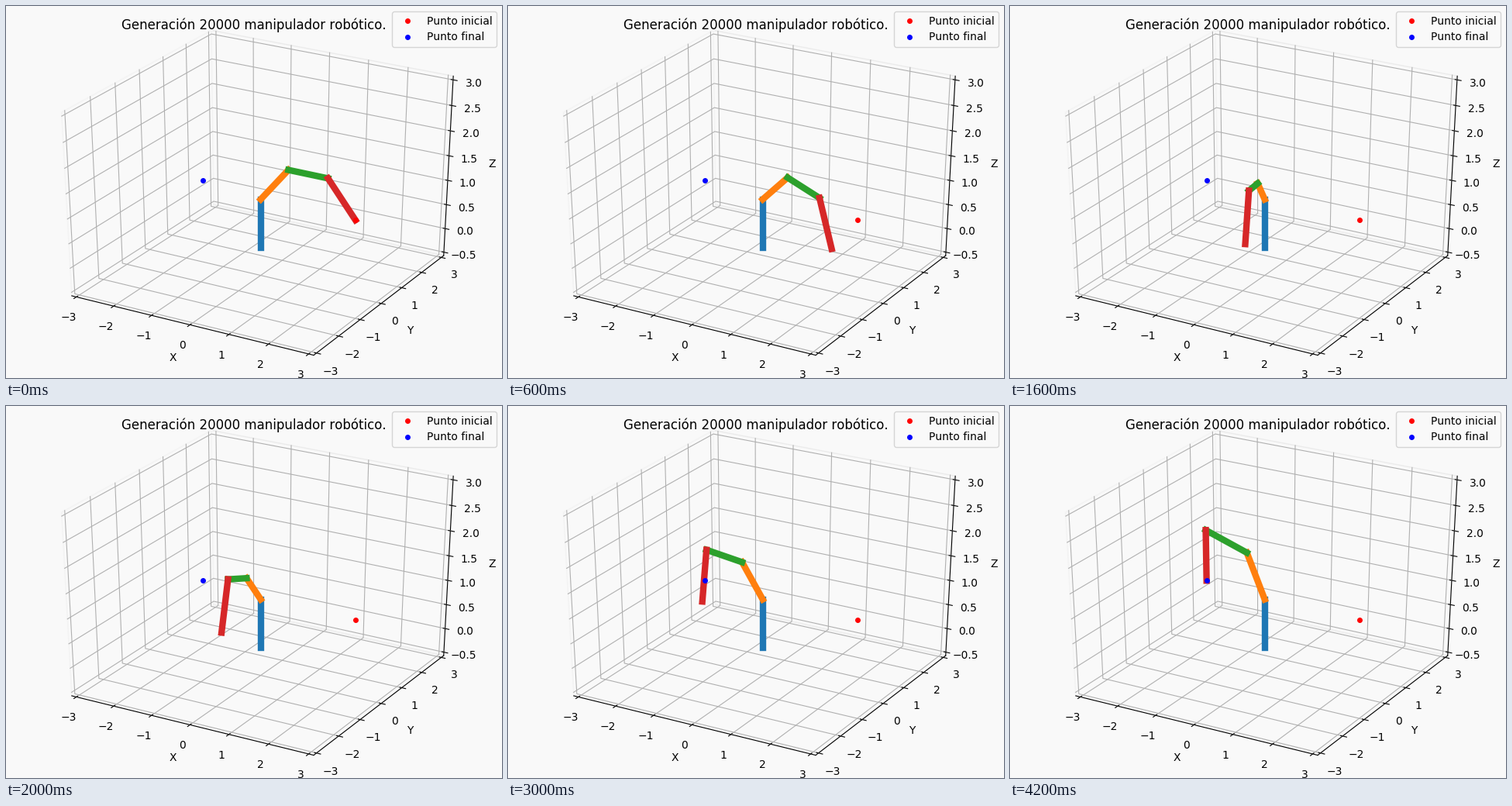
A matplotlib script for the animation above (4400 ms loop, 640x480 px).

```python
import numpy as np
import matplotlib.pyplot as plt
from matplotlib.animation import FuncAnimation

plt.rcParams["text.kerning_factor"] = 6

W, H, DPI = 640, 480, 100
FRAMES, INTERVAL = 22, 200
BG = "#f9f9f9"

CENTRE = np.array([0, 0, 1.25])    # middle of the data ranges
SPAN = np.array([6, 6, 3.5])
EDGE = 0.5 + 1 / 48                # half size of the box, in unit-cube lengths
DIST = 10                          # camera distance
ELEV, AZIM = np.radians(30), np.radians(-60)
RIGHT = np.array([-np.sin(AZIM), np.cos(AZIM), 0])
UP = np.array([-np.sin(ELEV) * np.cos(AZIM),
               -np.sin(ELEV) * np.sin(AZIM), np.cos(ELEV)])
TOWARD = np.cross(RIGHT, UP)


def project(points):
    """Unit-cube points (centred on the origin) to stage pixels."""
    p = np.atleast_2d(points)
    depth = 1 - p @ TOWARD / DIST
    x = (0.95 + p @ RIGHT / depth) / 1.85 * W
    y = H - (0.95 + p @ UP / depth) / 1.85 * H
    return x, y


fig = plt.figure(figsize=(W / DPI, H / DPI), dpi=DPI, facecolor=BG)
ax = fig.add_axes([0, 0, 1, 1])
ax.set_xlim(0, W)
ax.set_ylim(H, 0)
ax.axis("off")


def stroke(points, color, width=0.8):
    ax.plot(*project(points), color=color, lw=width)


def put_text(point, text, va):
    x, y = project(point)
    ax.text(x[0], y[0], text, ha="center", va=va, fontsize=10)


def draw_pane(axis, side, color):
    """Three edges of the square at one side of the box."""
    square = np.array([(-1, -1), (-1, 1), (1, 1), (1, -1)])
    if axis:
        square = square[:, ::-1]
    stroke(np.insert(square, axis, side, axis=1) * EDGE, color, 1)


def draw_axis(index, edge, tick_dir, values, fmt, name):
    edge = np.array(edge) * EDGE
    back = np.array([-1, 1, -1]) * EDGE
    outward = np.sign(edge)
    per_point = 48 / (72 * (W + H) / DPI) / 12

    ends = np.array([edge, edge])
    ends[:, index] = -EDGE, EDGE
    stroke(ends, "black")
    put_text(edge + outward * 25 * per_point, name, "center")

    spots = (np.array(values) - CENTRE[index]) / SPAN[index]
    for u in spots:
        line = np.array([back] * 3)
        line[:, index] = u
        line[0, index - 2] *= -1
        line[2, index - 1] *= -1
        stroke(line, "#b0b0b0")
    for value, u in zip(values, spots):
        pos = edge.copy()
        pos[index] = u
        step = np.zeros(3)
        step[tick_dir] = outward[tick_dir] / 12
        stroke([pos - 0.1 * step, pos + 0.2 * step], "black")
        label = fmt.format(value).replace("-", "\u2212")
        put_text(pos + outward * 11.5 * per_point, label, "top")


draw_pane(0, -1, "#f3f3f3")
draw_pane(1, 1, "#ebebeb")
draw_pane(2, -1, "#efefef")
draw_axis(0, (0, -1, -1), 1, range(-3, 4), "{}", "X")
draw_axis(1, (1, 0, -1), 0, range(-3, 4), "{}", "Y")
draw_axis(2, (1, 1, 0), 0, np.arange(-0.5, 3.1, 0.5), "{:.1f}", "Z")

ax.text(W / 2, 30.07, "Generación 20000 manipulador robótico.",
        ha="center", va="baseline", fontsize=12)

# Key poses: step, base yaw, then the pitch of each moving link in degrees.
POSES = np.array([
    (0, 0, 45, 0, -45),
    (3, -15.3, 38.5, -9.5, -66.5),
    (5, -32.8, 36, -8.5, -79),
    (8, -71, 36, 10.5, -64.5),
    (13, -98.5, 51.5, 18.5, -83),
    (18, -145, 64, 29, -81),
    (21, -157, 66.5, 24, -90),
])
STEPS, ANGLES = POSES[:, 0], np.radians(POSES[:, 1:])
SLOPES = np.gradient(ANGLES, STEPS, axis=0)


def angles_at(i):
    """Cubic Hermite curve through the key poses."""
    k = min(np.searchsorted(STEPS, i, side="right"), len(STEPS) - 1) - 1
    span = STEPS[k + 1] - STEPS[k]
    t = (i - STEPS[k]) / span
    ease = t * t * (3 - 2 * t)
    return (ANGLES[k] + (ANGLES[k + 1] - ANGLES[k]) * ease
            + span * t * (1 - t) * ((1 - t) * SLOPES[k] - t * SLOPES[k + 1]))


def joints_at(i):
    """Stage positions of the joints; every link has length one."""
    yaw, *pitch = angles_at(i)
    pitch = np.array([np.pi / 2, *pitch])
    reach = np.cumsum([0, *np.cos(pitch)])
    height = np.cumsum([0, *np.sin(pitch)])
    points = np.column_stack([reach * np.cos(yaw), reach * np.sin(yaw), height])
    return project((points - CENTRE) / SPAN)


def tip_dot(i, color, label):
    x, y = joints_at(i)
    return ax.plot(x[-1:], y[-1:], "o", color=color, ms=4, label=label,
                   zorder=4)[0]


dots = [tip_dot(0, "red", "Punto inicial"),
        tip_dot(FRAMES - 1, "blue", "Punto final")]
ax.legend(handles=dots, loc="upper right", fontsize=10, numpoints=1,
          facecolor=BG, edgecolor="0.8", framealpha=0.8)

links = [ax.plot([], [], color=f"C{n}", lw=6, solid_capstyle="projecting",
                 zorder=3)[0] for n in range(4)]


def update(i):
    x, y = joints_at(i)
    for n, link in enumerate(links):
        link.set_data(x[n:n + 2], y[n:n + 2])
    return links


anim = FuncAnimation(fig, update, frames=FRAMES, interval=INTERVAL,
                     repeat=True, repeat_delay=0)
plt.show()
```
